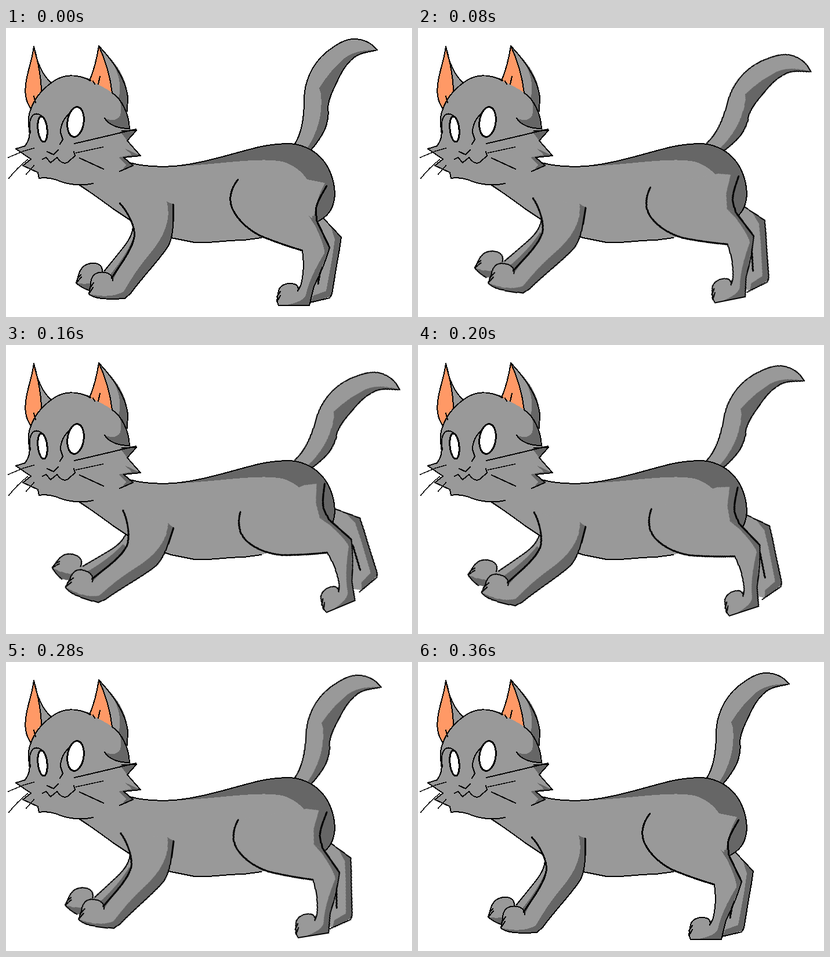
Write an HTML page without scripts that moves like this. It is 700 px wide and 500 px high and loops after 0.4 s.

```html
<!DOCTYPE html>
<html lang="en">
<head>
<meta charset="utf-8">
<title>Cat</title>
<style>
  html, body { margin: 0; width: 100%; height: 100%; overflow: hidden; background: #fff; }
  svg { display: block; width: 700px; height: 500px; shape-rendering: crispEdges; }
  path, ellipse { fill: none; }
  .line { stroke: #000; stroke-width: 2; stroke-linecap: round; stroke-linejoin: round; }
  .bold { stroke-width: 3; }
  .thin { stroke-width: 1.5; }
  .light { fill: #999; }
  .dark { fill: #666; }
  .pink { fill: #f96; }
  .white { fill: #fff; }

  .leg { animation: swing 400ms infinite; }
  .near.front { --turn: 18deg; transform-origin: 253px 312px; }
  .far.front { --turn: 20.7deg; transform-origin: 254px 300px; }
  .near.hind { --turn: -22.7deg; transform-origin: 468px 265px; }
  .far.hind { --turn: -26.7deg; transform-origin: 462px 263px; }
  .tail { transform-origin: 510px 205px; animation: wag 400ms step-end infinite; }
  .rest { animation: rest 400ms step-end infinite; }

  @keyframes swing {
    0% { transform: rotate(0deg); animation-timing-function: steps(4); }
    40% { transform: rotate(var(--turn)); animation-timing-function: steps(5); }
    90%, 100% { transform: rotate(0deg); }
  }
  /* even rise, then a quadratic ease back */
  @keyframes wag {
    0% { transform: rotate(0deg); }
    10% { transform: rotate(7.2deg); }
    20% { transform: rotate(14.4deg); }
    30% { transform: rotate(21.6deg); }
    40% { transform: rotate(15deg); }
    50% { transform: rotate(9.6deg); }
    60% { transform: rotate(5.4deg); }
    70% { transform: rotate(2.4deg); }
    80% { transform: rotate(.6deg); }
    90%, 100% { transform: rotate(0deg); }
  }
  @keyframes rest {
    0%, 90%, 100% { opacity: 1; }
    10% { opacity: 0; }
  }
</style>
</head>
<body>
<svg viewBox="0 0 700 500">
  <g class="tail">
    <path class="light" d="M497 202C509 184 514 155 514 125C514 95 526 64 552 42C568 30 583 19 600 19C618 19 630 26 640 38C625 42 612 42 600 51C580 68 575 85 565 105C558 120 555 130 555 140C557 150 554 165 550 175C543 190 533 203 525 212Z"/>
    <path class="dark" d="M640 38Q604 37 584 52Q560 72 540 104L543 114Q548 165 518 210L525 212C533 203 543 190 550 175C554 165 557 150 555 140C555 130 558 120 565 105C575 85 580 68 600 51C612 42 625 42 640 38Z"/>
    <path class="line" d="M497 202C509 184 514 155 514 125C514 95 526 64 552 42C568 30 583 19 600 19C618 19 630 26 640 38C625 42 612 42 600 51C580 68 575 85 565 105C558 120 555 130 555 140C557 150 554 165 550 175C543 190 533 203 525 212"/>
  </g>

  <g class="leg far hind">
    <path class="light" d="M520 320L548 330L578 362L571 405L562 464L525 475L510 465L515 400Z"/>
    <path class="dark" d="M560 343L578 362L571 405L562 464L525 475L530 463L552 455L562 400L567 366Z"/>
    <path class="line" d="M544 326L548 330L578 362Q575 385 571 405L562 460L558 467L520 476"/>
    <path class="line bold" d="M546 398L538 443"/>
  </g>

  <g class="leg far front">
    <path class="light" d="M218 335C222 350 214 365 202 380L166 422C167 408 155 406 147 407C132 409 126 420 124 432L121 441Q129 449 143 454L200 444L245 370Z"/>
    <path class="dark" d="M221 360Q207 395 172 436Q140 446 121 441Q129 449 143 454L200 444L245 370Z"/>
    <path class="line" d="M218 335C222 350 214 365 202 380L170 420M166 422C167 408 155 406 147 407C132 409 126 420 124 432L121 441Q129 449 143 454M124 432L129 427M122 440L130 431"/>
  </g>

  <path class="light" d="M215 333H548L440 363L410 367C380 367 350 373 325 371L270 358Z"/>
  <path class="light" d="M215 333L185 313C165 298 150 287 127 272L160 225L213 233C235 239 260 241 290 239C340 235 400 214 440 205C460 201 475 200 490 200C515 202 540 214 555 241C566 262 570 288 564 305C560 320 550 328 539 334Z"/>
  <path class="dark" d="M285 240C340 235 400 214 440 205C460 201 475 200 490 200C515 202 540 214 555 241C566 262 570 288 564 305C560 320 550 328 539 334L528 334L527 280L519 262Q505 240 477 231C435 223 370 236 285 240Z"/>
  <path class="line" d="M215 333L185 313C165 298 150 287 127 272M213 233C235 239 260 241 290 239C340 235 400 214 440 205C460 201 475 200 490 200C515 202 540 214 555 241C566 262 570 288 564 305C560 320 550 328 539 334M440 363L410 367C380 367 350 373 325 371L285 363L270 358"/>

  <g class="leg near hind">
    <path class="light" d="M400 262C386 280 384 298 390 312C400 335 425 355 447 363C470 373 490 379 511 385C513 400 514 425 507 446L503 447C495 440 475 441 470 454L467 472L470 480H523L531 447L558 380L537 336L522 325L526 298L540 268L519 262Z"/>
    <path class="light rest" d="M519 262L550 268Q536 292 531 325L522 325L530 268Z"/>
    <path class="dark" d="M522 325L537 336L558 380L531 447L523 480H478Q512 475 517 462Q524 430 549 390Q550 378 533 342Z"/>
    <path class="line" d="M503 455Q506 447 498 443C485 440 473 444 470 454L467 472L470 480H523L531 447Q549 412 558 380M467 465L473 456M468 472L473 463"/>
    <path class="line" d="M447 363C470 373 490 379 511 385C513 400 514 425 508 446L503 455"/>
    <path class="line bold" d="M400 262C386 280 384 298 390 312C400 335 425 355 447 363Q480 376 511 385M553 273C546 286 536 300 534 315L536 334L558 380"/>
  </g>

  <g class="leg near front">
    <path class="light" d="M196 303C210 318 224 345 221 362C217 385 195 412 184 437C184 425 172 421 160 423C148 426 146 435 146 444L143 460C150 468 175 470 205 468L215 459C240 425 270 395 281 375C287 362 288 350 288 335V305L277 300Z"/>
    <path class="dark" d="M277 300L288 305V335C288 350 287 362 281 375C270 395 240 425 215 459L205 468C175 470 150 468 143 460Q180 469 203 456Q223 420 250 388C272 362 286 330 277 300Z"/>
    <path class="line" d="M184 437C184 425 172 421 160 423C148 426 146 435 146 444L143 460C150 468 175 470 205 468L215 459C240 425 270 395 281 375C287 362 288 350 288 335M144 451L151 441M144 458L150 449"/>
    <path class="line bold" d="M196 303C210 318 224 345 221 362C217 385 195 412 182 433M288 335V305"/>
  </g>

  <g class="head">
    <path class="light" d="M48 32Q58 75 78 95L61 108Z"/>
    <path class="pink" d="M48 32C45 60 30 90 34 118Q36 130 43 140Q49 121 61 108Q60 75 48 32Z"/>
    <path class="light" d="M160 31C182 54 207 88 210 120L209 146L183 112Z"/>
    <path class="dark" d="M178 50C200 74 209 97 210 120L209 146L194 122Q203 88 178 50Z"/>
    <path class="light" d="M43 140Q52 114 78 95C98 79 122 79 146 88L172 98L183 112C200 124 212 148 213 174L225 177L209 195L232 221L203 224L219 238L196 248L150 269Q123 275 95 266Q75 257 57 260L55 250L29 238L43 227L17 209L33 204Q43 190 40 176Q36 155 43 140Z"/>
    <path class="pink" d="M160 31Q155 65 144 91Q169 102 183 112Q178 70 160 31Z"/>
    <path class="dark" d="M170 156Q190 164 197 151Q200 140 196 123Q212 145 213 174Q182 174 170 156ZM197 179L225 177L209 195ZM204 208L232 221L203 224L219 238L200 246L207 237L194 224L217 219Z"/>
    <path class="line" d="M61 108Q60 75 48 32C45 60 30 90 34 118Q36 130 43 140Q52 114 78 95M48 32Q56 75 78 95C98 79 122 79 146 91M144 91Q155 65 160 31C182 54 207 88 210 120L209 144M160 31Q178 70 183 112M183 112C200 124 212 148 213 174Q182 174 170 156M51 129L48 118M159 97L162 84M153 97L150 92"/>
    <path class="line" d="M200 178L225 177L209 195L232 221L203 224L219 238L196 248M43 140Q36 155 40 176Q43 190 33 204L17 209L43 227L29 238L55 250L57 260Q75 257 95 266Q123 275 150 269"/>
    <path class="line" d="M42 181Q38 155 49 149Q56 147 62 153M125 138C103 147 94 165 94 181L98 193L93 201M71 214L82 219L90 211M63 227L69 224L77 233L88 224Q98 238 107 232L119 221L117 214"/>
    <path class="line" d="M118 200L165 189L224 175M127 225L168 244"/>
    <path class="line thin" d="M121 216L167 206M4 224L30 213L48 208M5 260Q19 242 37 228M35 253L48 238"/>
    <ellipse class="line bold white" cx="63" cy="175" rx="8" ry="22" transform="rotate(-6 63 175)"/>
    <ellipse class="line bold white" cx="120" cy="162.500" rx="14" ry="26" transform="rotate(8 120 162.500)"/>
  </g>
</svg>
</body>
</html>
```
